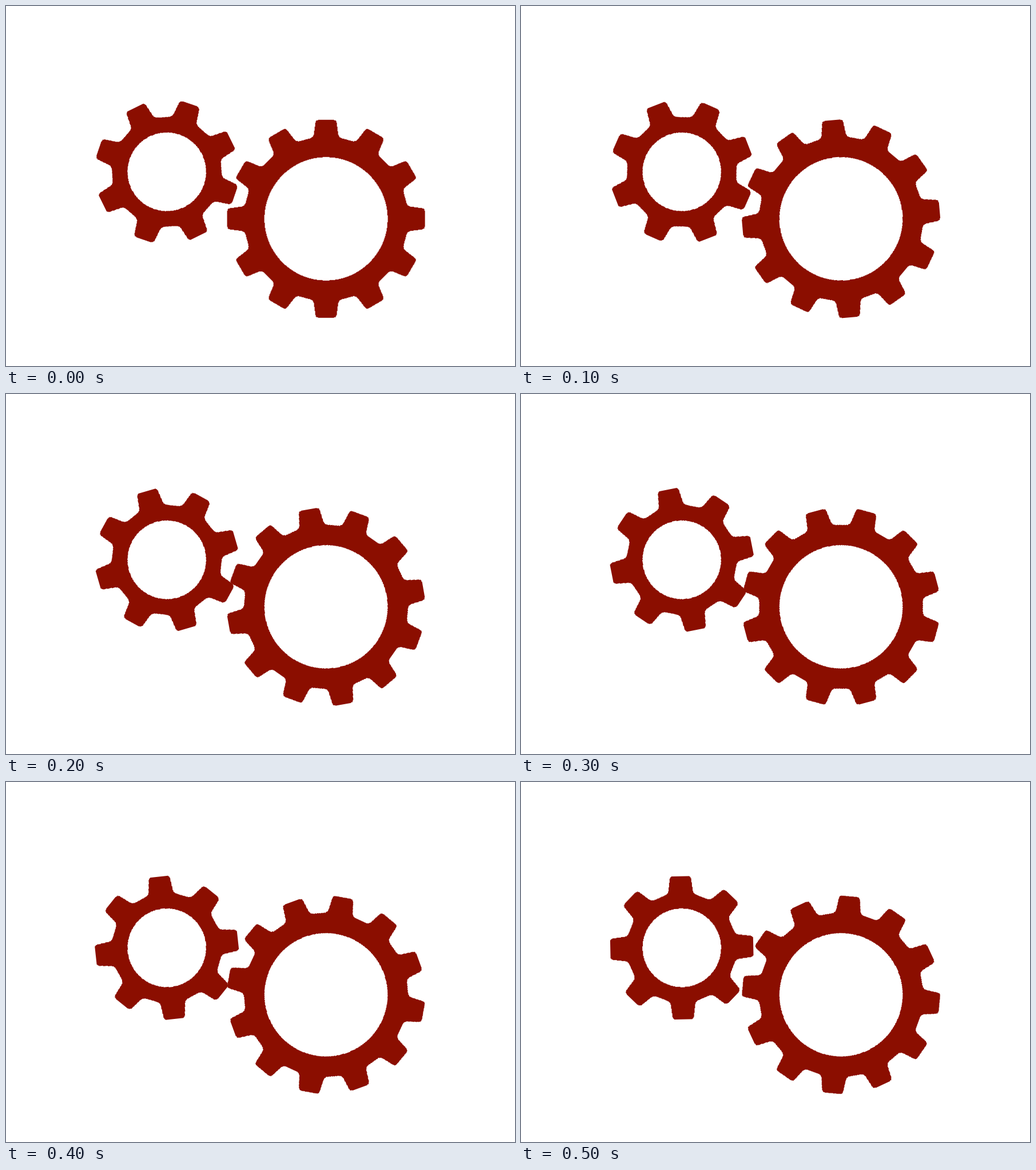
Write an HTML page that moves like this. It is 890x629 px and loops after 0.6 s.

```html
<!DOCTYPE html>
<html lang="en">
<head>
<meta charset="utf-8">
<title>Gears</title>
<style>
  html, body { margin: 0; width: 100%; height: 100%; overflow: hidden; background: #fff; }
  svg { display: block; width: 100%; height: 100%; }
  path { fill: #8b0e00; fill-rule: evenodd; shape-rendering: crispEdges; }
  #small { animation: small 600ms steps(6, end) infinite; }
  #large { animation: large 600ms steps(6, end) infinite; }
  @keyframes small { from { transform: rotate(-26.2deg); } to { transform: rotate(3.8deg); } }
  @keyframes large { from { transform: rotate(0deg); } to { transform: rotate(-30deg); } }
</style>
</head>
<body>
<svg viewBox="0 0 890 629">
  <g transform="translate(281.2 289.7)"><path id="small"/></g>
  <g transform="translate(559.6 371.8)"><path id="large"/></g>
</svg>
<script>
  const TIP = 18;      // half width of a tooth at its tip
  const SLOPE = 0.13;  // widening of a tooth towards its root
  const fmt = (x, y) => x.toFixed(2) + ' ' + y.toFixed(2);

  // Closed polygon whose corners are replaced by circular arcs.
  function roundedPath(pts) {
    const n = pts.length;
    return pts.map((p, i) => {
      const toward = q => {
        const dx = q.x - p.x, dy = q.y - p.y, len = Math.hypot(dx, dy);
        return { x: dx / len, y: dy / len };
      };
      const a = toward(pts[(i + n - 1) % n]);
      const b = toward(pts[(i + 1) % n]);
      const half = Math.acos(a.x * b.x + a.y * b.y) / 2;
      const t = p.r / Math.tan(half);
      const sweep = a.x * b.y - a.y * b.x < 0 ? 1 : 0;
      return (i ? 'L' : 'M') + fmt(p.x + a.x * t, p.y + a.y * t) +
        `A${p.r} ${p.r} 0 0 ${sweep} ` + fmt(p.x + b.x * t, p.y + b.y * t);
    }).join('') + 'Z';
  }

  function gear(teeth, outer, valley, hole) {
    const phi = Math.PI / teeth;
    const sin = Math.sin(phi), cos = Math.cos(phi);
    // Where the tooth flank meets the flat valley.
    const root = (valley - sin * (TIP + SLOPE * outer)) / (cos - SLOPE * sin);
    const base = TIP + SLOPE * (outer - root);
    const tooth = [[-base, root, 10], [-TIP, outer, 6], [TIP, outer, 6], [base, root, 10]];
    const pts = [];
    for (let i = 0; i < teeth; i++) {
      const s = Math.sin(2 * phi * i), c = Math.cos(2 * phi * i);
      for (const [x, y, r] of tooth) pts.push({ x: x * c + y * s, y: x * s - y * c, r });
    }
    return roundedPath(pts) +
      `M${-hole} 0A${hole} ${hole} 0 1 0 ${hole} 0A${hole} ${hole} 0 1 0 ${-hole} 0Z`;
  }

  document.getElementById('small').setAttribute('d', gear(8, 125.2, 95.5, 68.7));
  document.getElementById('large').setAttribute('d', gear(12, 172.7, 143, 107.8));
</script>
</body>
</html>
```
